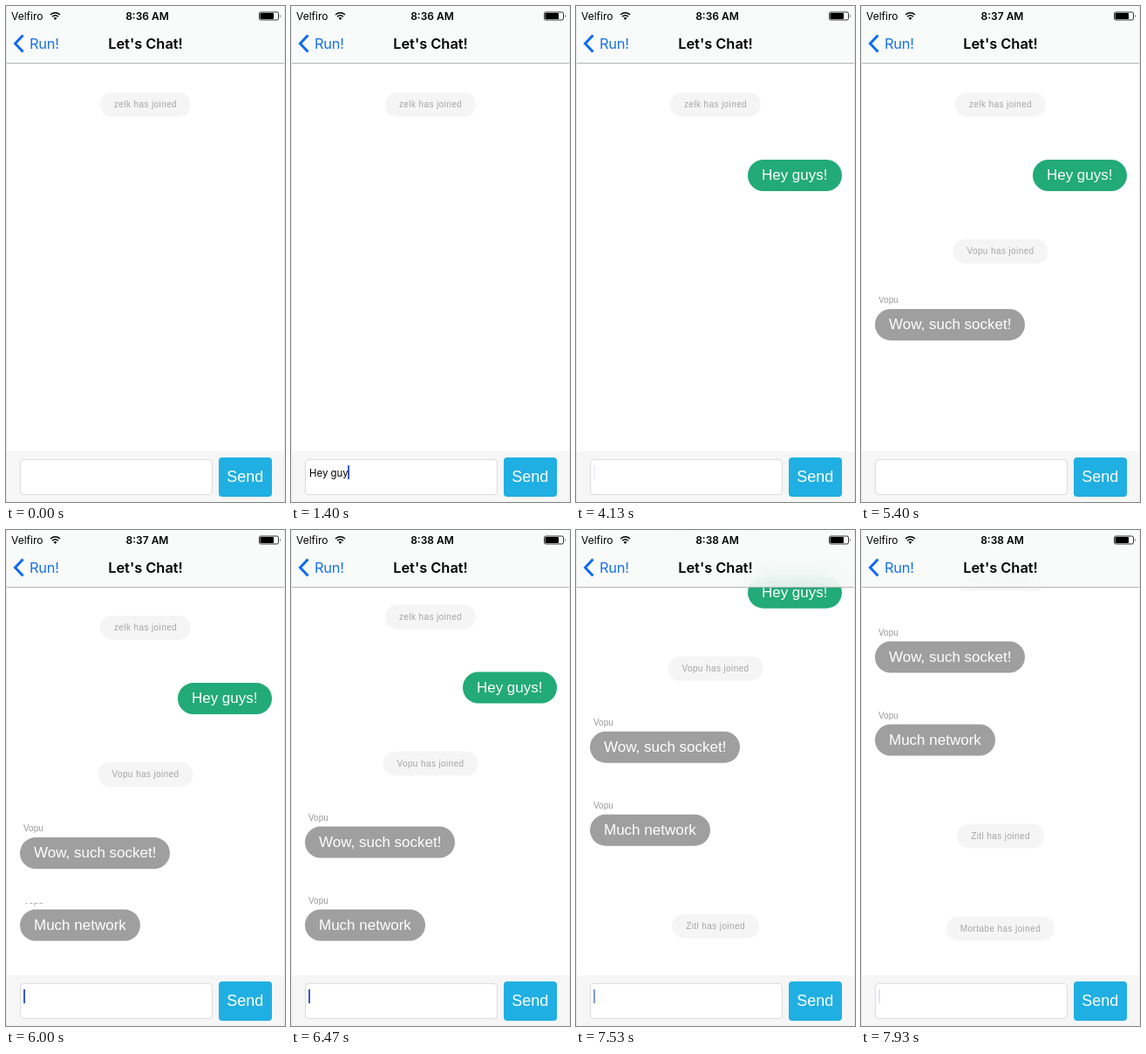
An HTML page for the animation above (8000 ms loop, 320 by 568 pixels).

```html
<!DOCTYPE html>
<html lang="en">
<head>
<meta charset="utf-8">
<title>Chat</title>
<style>
  html, body { margin: 0; width: 100%; height: 100%; overflow: hidden; background: #fff; }
  #stage { position: relative; width: 320px; height: 568px; overflow: hidden; background: #fff;
    font-family: "Liberation Sans", Arial, sans-serif; white-space: pre; }
  #stage div, svg { position: absolute; }
  svg { left: 0; top: 0; }
  #list { left: 0; top: 0; width: 320px; height: 800px; }
  .item { left: 0; width: 320px; height: 95px; overflow: hidden; }
  .item > div { inset: 0; }
  .item .bubble { left: 16px; top: 19.5px; height: 36px; padding: 0 16px; border-radius: 18px;
    background: #9f9f9f; color: #fff; font-size: 17px; line-height: 36px; }
  .item .mine { left: auto; right: 15.5px; background: #22aa78; }
  .label { left: 20px; top: 3.5px; font-size: 10px; line-height: 12px; color: #999; }
  .pill { left: 50%; transform: translateX(-50%); height: 28px; padding: 0 16px; border-radius: 14px;
    background: #f5f5f5; color: #a5a5a5; font-size: 10px; line-height: 28px; letter-spacing: .4px; }
  #header { left: 0; top: 0; width: 320px; height: 65px; border-bottom: 1px solid #b4b4b6;
    background: rgba(248, 249, 250, .85); backdrop-filter: blur(12px);
    font-family: Inter, sans-serif; font-size: 12px; color: #000; }
  #header div { line-height: 24px; }
  .center { left: 0; width: 100%; text-align: center; font-weight: 600; }
  #footer { left: 0; top: 510px; width: 320px; height: 58px; background: #f6f6f6; }
  #field { left: 16px; top: 9px; width: 219px; height: 39px; border: 1px solid #dcdcdc;
    border-radius: 4px; background: #fff; }
  #typed { left: 21px; top: 17px; font: 11.4px/16px Inter, sans-serif; color: #000; }
  #caret { top: 16px; width: 2px; height: 16px; background: #3b57d6; }
  #send { left: 244px; top: 7px; width: 60.5px; height: 45px; border-radius: 4px; background: #20afe2;
    color: #fff; font-size: 18px; line-height: 45px; text-align: center; }
  #edge { inset: 0; border: solid #e9e9e9; border-width: 0 1px; }
</style>
</head>
<body>
<div id="stage">
  <div id="list"></div>
  <div id="header">
    <div style="left:6px;top:0">Velfiro</div>
    <div id="clock" class="center" style="top:0;left:2px"></div>
    <div style="left:27px;top:31px;font-size:16.4px;letter-spacing:-.2px;color:#1673ea">Run!</div>
    <div class="center" style="top:31px;font-size:16.4px">Let's Chat!</div>
    <svg width="320" height="65" fill="none">
      <path d="M19.5 33.5 10.5 43l9 9.5" stroke="#0c6cf0" stroke-width="3"/>
      <path d="M51 10q5.500-4.500 11 0M53 12.300q3.500-3 7 0" stroke="#000" stroke-width="1.500"/>
      <path d="M54.500 13.800 56.500 16l2-2.200q-2-1.500-4 0" fill="#000"/>
      <rect x="290.500" y="7" width="22" height="9" rx="1.800" stroke="#000" stroke-width=".8"/>
      <rect x="291.500" y="8" width="15.500" height="7" rx=".8" fill="#000"/>
      <path d="M314 10v3q1.300-1.500 0-3" fill="#000"/>
    </svg>
  </div>
  <div id="footer">
    <div id="field"></div>
    <div id="typed"></div>
    <div id="caret"></div>
    <div id="send">Send</div>
  </div>
  <div id="edge"></div>
  <svg id="pointer" width="14" height="18">
    <path d="M1 1v12.500l3-2.700 2 4.700 2.200-1-2-4.500h4z" fill="#000" stroke="#fff"/>
  </svg>
</div>
<script>
const LOOP = 8000, SLIDE = 17;
const byId = id => document.getElementById(id);
const progress = (t, start, length) => Math.min(1, Math.max(0, (t - start) / length));
const easeOut = p => 1 - (1 - p) ** 2;
const smooth = p => p * p * (3 - 2 * p);

// Linear interpolation through rows of [time, value, ...]
function track(rows, t, column = 1) {
  const next = rows.findIndex(row => row[0] > t);
  if (next < 0) return rows.at(-1)[column];
  if (next === 0) return rows[0][column];
  const a = rows[next - 1], b = rows[next];
  return a[column] + (b[column] - a[column]) * (t - a[0]) / (b[0] - a[0]);
}

function add(parent, className, text = '') {
  const el = document.createElement('div');
  el.className = className;
  el.textContent = text;
  parent.append(el);
  return el;
}

const notices = [
  ['zelk', 98.5, -1000], ['Vopu', 266.5, 4500], ['Zitl', 561.5, 7130], ['Mortabe', 668, 7490]
].map(([name, top, start]) => {
  const el = add(byId('list'), 'pill', name + ' has joined');
  el.style.top = top + 'px';
  return { el, start };
});

const messages = [
  ['', 'Hey guys!', 156, 3270], ['Vopu', 'Wow, such socket!', 333, 5200], ['Vopu', 'Much network', 428, 5930]
].map(([author, text, top, start]) => {
  const item = add(byId('list'), 'item');
  item.style.top = top + 'px';
  const el = add(item, '');
  add(el, 'label', author);
  add(el, author ? 'bubble' : 'bubble mine', text);
  return { item, el, start };
});

const scrolls = [[5930, 450, 13.5], [7130, 340, 106], [7490, 420, 106]];
const keyTimes = [70, 170, 270, 400, 1130, 1270, 1400, 1530, 1800];
const caretFade = [
  [0, 0], [69, 0], [70, 1], [930, 1], [1100, 0], [1129, 0], [1130, 1], [2330, 1], [2530, 0],
  [3269, 0], [3270, 1], [3670, 1], [3870, 0], [4110, 0], [4330, 1], [4670, 1], [4870, 0],
  [5580, 0], [5800, 1], [7130, 1], [7300, 0], [7420, 0], [7600, 1], [7730, 1], [7940, .12]
];
const pointerPath = [[2800, 315, 556], [3130, 280, 540], [3330, 280, 540], [3600, 322, 560]];

function draw(t) {
  const scroll = scrolls.reduce((sum, [start, length, by]) => sum + by * smooth(progress(t, start, length)), 0);
  byId('list').style.transform = `translateY(${-scroll}px)`;
  for (const { el, start } of notices) el.style.opacity = progress(t, start, 370);
  for (const { item, el, start } of messages) {
    item.style.visibility = t < start ? 'hidden' : 'visible';
    el.style.transform = `translateY(${SLIDE * (easeOut(progress(t, start, 500)) - 1)}px)`;
  }

  byId('clock').textContent = `8:${t < 4200 ? 36 : t < 6130 ? 37 : 38} AM`;
  const typed = byId('typed'), caret = byId('caret');
  typed.textContent = t < 3270 ? 'Hey guys!'.slice(0, keyTimes.filter(k => k <= t).length) : '';
  caret.style.left = 20 + typed.getBoundingClientRect().width + 'px';
  caret.style.opacity = track(caretFade, t);

  const pointer = byId('pointer');
  pointer.style.visibility = t >= 2800 && t < 3600 ? 'visible' : 'hidden';
  pointer.style.transform = `translate(${track(pointerPath, t)}px, ${track(pointerPath, t, 2)}px)`;
}

function frame() {
  draw(performance.now() % LOOP);
  requestAnimationFrame(frame);
}
frame();
</script>
</body>
</html>
```
